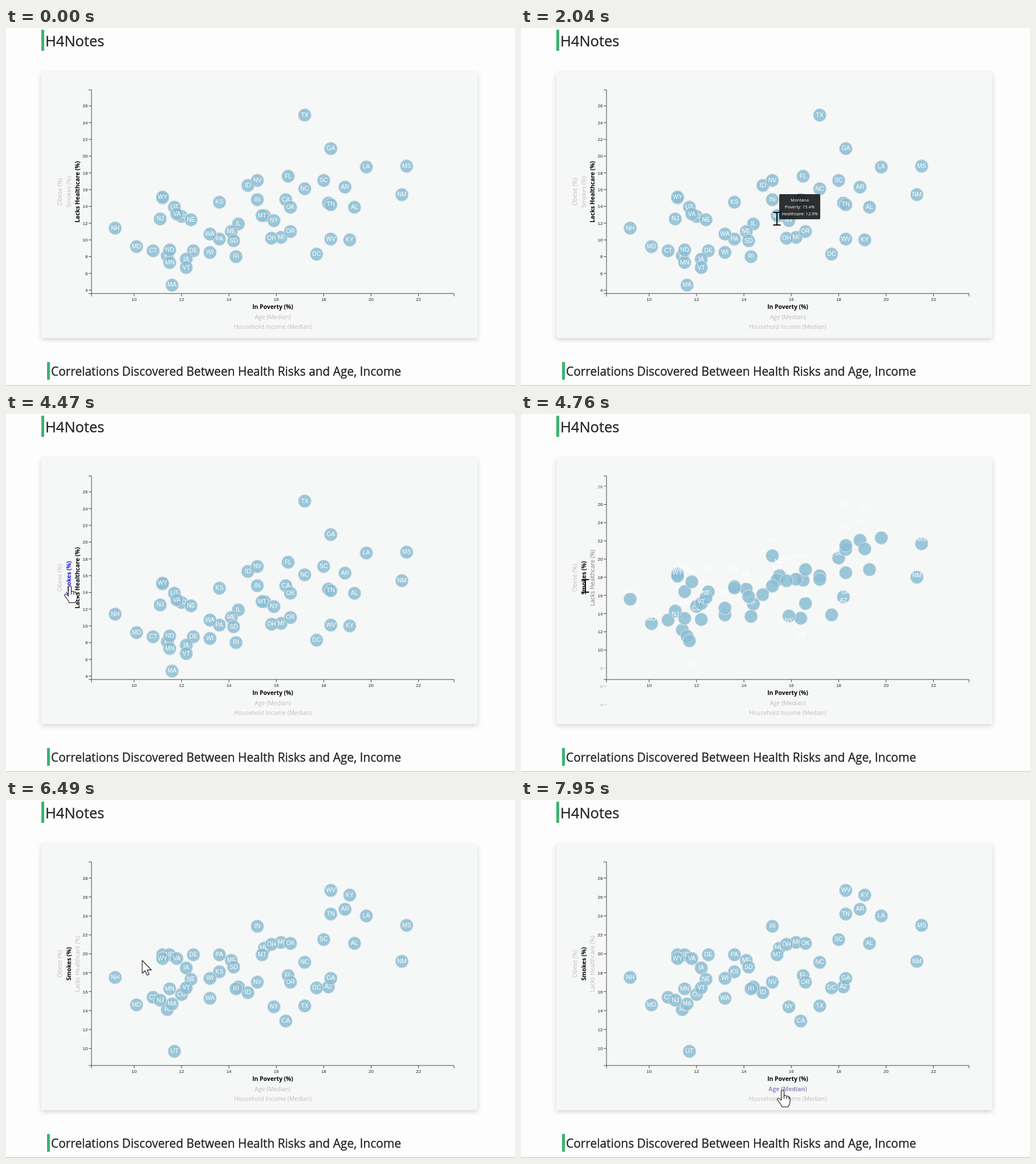
Recreate the animation shown at these times as an HTML page. Size 893 px wide and 627 px high, loop 8000 ms.

```html
<!DOCTYPE html>
<html lang="en">
<head>
<meta charset="utf-8">
<title>Health risk chart</title>
<style>
  html, body { margin: 0; width: 100%; height: 100%; overflow: hidden; background: #fdfdfd; }
  .card {
    position: absolute; left: 62px; top: 77px; width: 765px; height: 466px;
    background: #f6f8f8; border-radius: 3px; box-shadow: 0 3px 8px rgba(0, 0, 0, .17);
  }
  svg { position: absolute; left: 0; top: 0; font-family: "Open Sans", sans-serif; }
  .bar { fill: #3cb371; }
  .heading { fill: #212529; stroke: #212529; stroke-width: .35px; }
  .axis { fill: none; stroke: #444; stroke-width: 1; }
  .tick { font: 8px "Liberation Sans", sans-serif; fill: #222; }
  .tick line { stroke: #444; }
  .name { font-size: 10.35px; text-anchor: middle; }
  .state circle { fill: #89bdd3; fill-opacity: .85; stroke: #e3e3e3; stroke-width: 1; }
  .state text { font: 10.5px "Liberation Sans", sans-serif; fill: #fff; text-anchor: middle; }
  .tip rect { fill: #181a1b; fill-opacity: .9; }
  .tip text { font-size: 7.6px; fill: #fff; text-anchor: middle; }
  .cursor { fill: #fff; stroke: #111; stroke-width: 1.1; stroke-linejoin: round; }
  #ibeam { fill: none; stroke-width: 2; }
</style>
</head>
<body>
<div class="card"></div>
<svg id="stage" width="893" height="627" viewBox="0 0 893 627">
  <rect class="bar" x="62" y="3" width="5" height="37"/>
  <text class="heading" x="69" y="32" font-size="25.5">H4Notes</text>
  <rect class="bar" x="72" y="585" width="5" height="31"/>
  <text class="heading" x="79" y="609" font-size="20.9">Correlations Discovered Between Health Risks and Age, Income</text>
  <rect y="625.5" width="893" height="1.5" fill="#b9dbe4"/>
  <g id="ticks"></g>
  <path class="axis" d="M145 108.5H150V465H145M150 470V465H786V470"/>
  <g id="states"></g>
  <g id="names"></g>
  <g id="tip" class="tip">
    <rect x="453" y="291" width="72" height="44" rx="2"/>
    <text x="489" y="303.5">Montana</text>
    <text x="489" y="316">Poverty: 15.4%</text>
    <text x="489" y="328">Healthcare: 12.9%</text>
  </g>
  <g id="cursor" class="cursor">
    <path id="arrow" d="M0 0V22.5L5 18L8.5 25.7L12 24.2L8.7 16.6H16Z"/>
    <path id="ibeam" d="M-6.5-11H6.5M0-11V11M-6.5 11H6.5"/>
    <path id="hand" d="M-2.5 18V2.5Q-2.5 0 0 0T2.5 2.5V10Q5 8 7 11Q10 9.5 11 12.5Q13 12 13 15V20Q12.5 26 9 29.5H-1Q-3 25-8.5 18Q-10.5 15-7.5 14.5Q-5 15-2.5 18ZM2.5 10V15M7 11V15.5M11 12.5V16"/>
  </g>
</svg>
<script>
const LOOP = 8000, FRAME = 95, CLICK = 4475, MORPH = 500;
const GREY = [198, 187, 183], BLACK = [0, 0, 0], BLUE = [26, 26, 208];

// state, poverty, lacks healthcare, smokes
const rows = `AL 19.3 13.9 21.1|AK 11.2 15 19.9|AZ 18.2 14.4 16.5|AR 18.9 16.3 24.7|CA 16.4 14.8 12.9
CO 12 12.8 15.7|CT 10.8 8.7 15.4|DE 12.5 8.7 19.9|DC 17.7 8.3 16.4|FL 16.5 17.6 17.7
GA 18.3 20.9 17.4|HI 11.4 8.1 14.1|ID 14.8 16.5 15.9|IL 14.4 11.9 16.5|IN 15.2 14.8 22.9
IA 12.2 7.7 18.5|KS 13.6 14.5 18.1|KY 19.1 10 26.2|LA 19.8 18.7 24|ME 14.1 11 19.3
MD 10.1 9.2 14.6|MA 11.6 4.6 14.7|MI 16.2 10.3 21.2|MN 11.5 7.3 16.3|MS 21.5 18.8 23
MO 15.5 12.9 20.6|MT 15.4 12.9 19.9|NE 12.4 12.4 17.3|NV 15.2 17.1 17|NH 9.2 11.4 17.5
NJ 11.1 12.5 15.1|NM 21.3 15.4 19.2|NY 15.9 12.3 14.4|NC 17.2 16.1 19.1|ND 11.5 8.8 19.9
OH 15.8 10.2 21|OK 16.6 13.9 21.1|OR 16.6 11 17|PA 13.6 10.1 19.9|RI 14.3 8 16.3
SC 18 17.1 21.5|SD 14.2 9.9 18.6|TN 18.3 14.2 24.2|TX 17.2 24.9 14.5|UT 11.7 13.9 9.7
VT 12.2 6.7 16.4|VA 11.8 13.1 19.5|WA 13.2 10.7 15.3|WV 18.3 10.1 26.7|WI 13.2 8.5 17.4
WY 11.2 15.1 19.5`.split(/[|\n]/).map(row => row.split(' '));

// time, x, y, shape
const path = [
  [600, 514, 539, 'arrow'], [695, 409, 474, 'arrow'], [790, 469, 495, 'arrow'],
  [995, 469, 495, 'arrow'], [1650, 438, 355, 'arrow'], [1755, 438, 355, 'arrow'],
  [1945, 447, 337, 'ibeam'], [2040, 449, 334, 'ibeam'], [3135, 449, 334, 'arrow'],
  [3900, 116, 303, 'hand'], [4000, 112, 301, 'hand'], [4470, 112, 301, 'hand'],
  [4565, 113, 301, 'ibeam'], [4850, 113, 301, 'arrow'], [5510, 265, 273, 'arrow'],
  [5700, 252, 277, 'arrow'], [6295, 252, 277, 'arrow'], [6490, 239, 281, 'arrow'],
  [7170, 328, 312, 'arrow'], [7860, 456, 500, 'hand'], [7950, 459, 508, 'hand']
];

const $ = id => document.getElementById(id);
const lerp = (a, b, p) => a + (b - a) * p;
const clamp = v => Math.min(1, Math.max(0, v));
const easeCubic = p => p < .5 ? 4 * p ** 3 : 1 - (2 - 2 * p) ** 3 / 2;
const mix = (a, b, p) => `rgb(${a.map((v, i) => Math.round(lerp(v, b[i], p)))})`;
const scale = (lo, hi, from, to) => v => lerp(from, to, (v - lo) / (hi - lo));
const stepped = (t, start) => start + Math.floor((t - start) / FRAME) * FRAME;

const xAt = scale(8.2, 23.5, 150, 786);
const careAt = scale(3.6, 27.9, 465, 108.5);
const smokeAt = scale(8.2, 29.7, 465, 108.5);

function add(parent, tag, attrs, text) {
  const el = document.createElementNS('http://www.w3.org/2000/svg', tag);
  for (const key in attrs) el.setAttribute(key, attrs[key]);
  if (text !== undefined) el.textContent = text;
  return parent.appendChild(el);
}

for (let v = 10; v <= 22; v += 2) {
  const g = add($('ticks'), 'g', { class: 'tick', transform: `translate(${xAt(v)} 465)` });
  add(g, 'line', { y2: 5 });
  add(g, 'text', { y: 13, 'text-anchor': 'middle' }, v);
}

const yTicks = [];
for (let v = 4; v <= 28; v += 2) {
  const g = add($('ticks'), 'g', { class: 'tick' });
  add(g, 'line', { x1: 145, x2: 150 });
  add(g, 'text', { x: 143.5, y: 3, 'text-anchor': 'end' }, v);
  yTicks.push({ v, g });
}

const states = rows.map(([abbr, poverty, care, smoke]) => {
  const x = xAt(+poverty);
  const g = add($('states'), 'g', { class: 'state' });
  return {
    from: careAt(+care), to: smokeAt(+smoke),
    circle: add(g, 'circle', { cx: x, r: 11.5 }),
    label: add(g, 'text', { x }, abbr)
  };
});

function addName(text, transform) {
  const el = add($('names'), 'text', { class: 'name', transform }, text);
  paint(el, mix(GREY, GREY, 0), false);
  return el;
}
function paint(el, fill, bold) {
  el.style.fill = fill;
  el.style.fontWeight = bold ? 700 : 400;
}

paint(addName('In Poverty (%)', 'translate(468 492)'), '#000', true);
const ageName = addName('Age (Median)', 'translate(468 509.5)');
addName('Household Income (Median)', 'translate(468 527)');
addName('Obese (%)', 'translate(98 287) rotate(-90)');
const smokesName = addName('Smokes (%)', 'translate(113.5 287) rotate(-90)');
const careName = addName('Lacks Healthcare (%)', 'translate(129 287) rotate(-90)');

function drawCursor(t) {
  const i = path.findLastIndex(key => key[0] <= t);
  $('cursor').style.display = i < 0 ? 'none' : '';
  if (i < 0) return;
  const [start, x, y, shape] = path[i];
  const [end, nextX, nextY] = path[i + 1] || [LOOP, x, y];
  const p = (stepped(t, start) - start) / (end - start);
  $('cursor').setAttribute('transform', `translate(${lerp(x, nextX, p)} ${lerp(y, nextY, p)})`);
  for (const id of ['arrow', 'ibeam', 'hand']) $(id).style.display = id === shape ? '' : 'none';
}

function render(t) {
  const p = easeCubic(clamp((stepped(t, CLICK - 5) - CLICK) / MORPH));
  const clicked = p > 0;

  for (const { v, g } of yTicks) {
    g.setAttribute('transform', `translate(0 ${lerp(careAt(v), smokeAt(v), p)})`);
    g.style.opacity = v < 10 ? 1 - p : v > 26 ? p : 1;
  }
  for (const { from, to, circle, label } of states) {
    circle.setAttribute('cy', lerp(from, to, p));
    label.setAttribute('y', (clicked ? to : from) + 3);
  }

  paint(careName, mix(BLACK, GREY, p), !clicked);
  paint(smokesName, clicked ? '#000' : mix(GREY, BLUE, clamp((t - 3900) / 400)), t >= 3900);
  paint(ageName, mix(GREY, BLUE, clamp((t - 7840) / 400)), t >= 7860);
  $('tip').style.display = t >= 1945 && t < 3230 ? '' : 'none';
  drawCursor(t);
}

const began = performance.now();
function loop() {
  render((performance.now() - began) % LOOP);
  requestAnimationFrame(loop);
}
loop();
</script>
</body>
</html>
```
